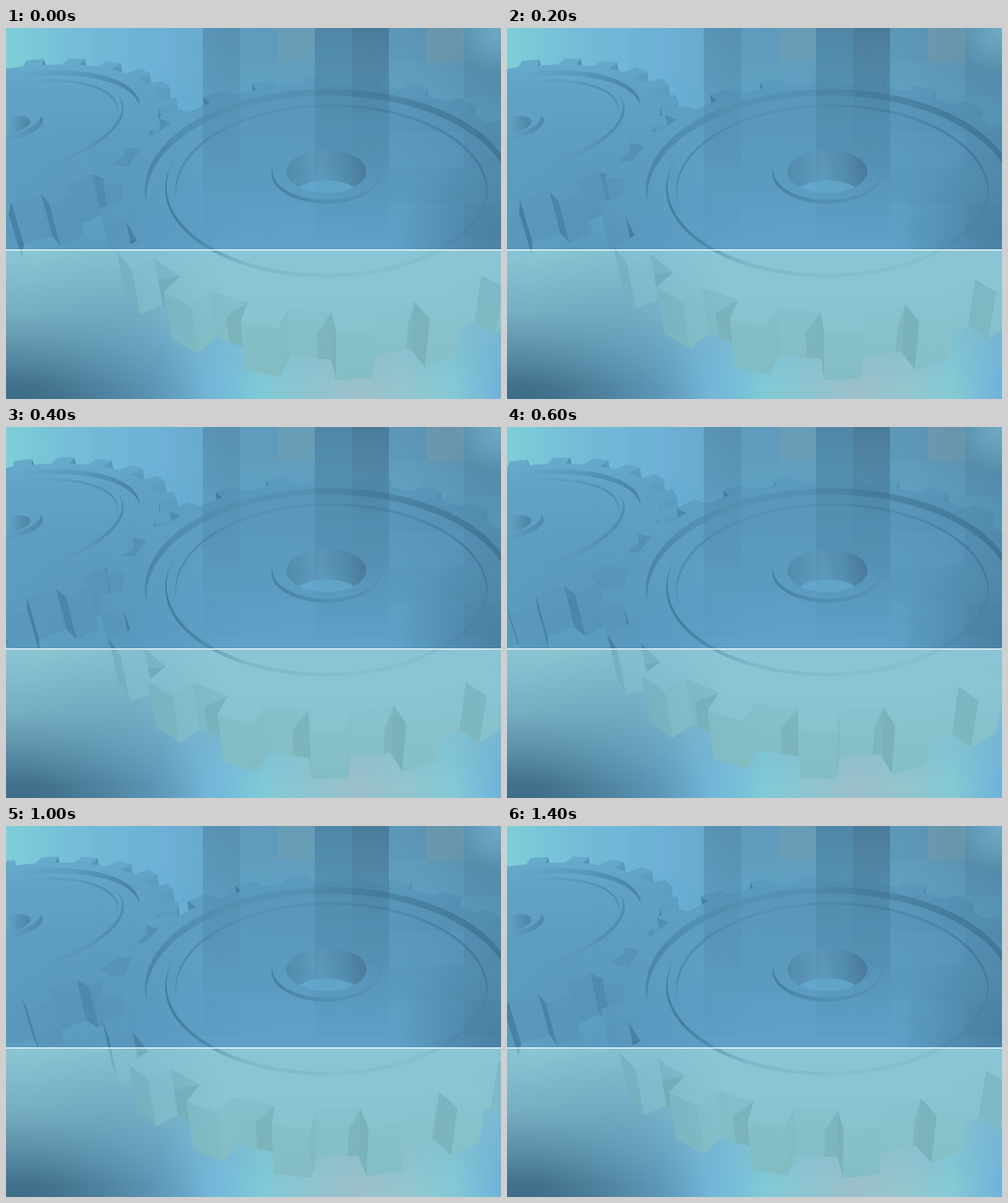
These frames come from a looping animation (800 by 600 pixels, 1500 ms). An HTML page with a canvas:

```html
<!DOCTYPE html>
<html lang="en">
<head>
<meta charset="utf-8">
<title>Gears</title>
<style>
  html, body { margin: 0; width: 100%; height: 100%; overflow: hidden; }
  canvas { display: block; }
</style>
</head>
<body>
<canvas id="stage" width="800" height="600"></canvas>
<script>
const ctx = document.getElementById('stage').getContext('2d');
const LOOP = 1500, STEP = 100, SPLIT = 359, TAU = Math.PI * 2, DEG = Math.PI / 180;
const LIGHT = 65 * DEG, DEPTH = 0.086;

// Both gears lie on one ground plane; v points to the viewer, t goes down.
const front = { u: 0.006, v: 0, tip: 1.004, root: 0.916, teeth: 20, phase: 85.2 * DEG, dir: 1 };
const back = { u: -1.66, v: -0.41, tip: 0.868, root: 0.771, teeth: 21, phase: 0.2 * DEG, dir: -1 };
const frontHub = { u: -0.006, v: 0 }, frontDisc = { u: 0.016, v: 0 }, backHub = { u: -1.66, v: -0.44 };

function project(u, v, t) {
  const w = 1 - 0.301 * v + 0.0387 * t;
  return [520 + 352 * u / w, -400 + (622 + 92 * t) / w];
}

function gradient(x0, y0, x1, y1, ...stops) {
  const g = ctx.createLinearGradient(x0, y0, x1, y1);
  stops.forEach(([at, color]) => g.addColorStop(at, color));
  return g;
}

function glow(x, y, r, rgb, alpha) {
  const g = ctx.createRadialGradient(x, y, 0, x, y, r);
  g.addColorStop(0, `rgba(${rgb},${alpha})`);
  g.addColorStop(0.45, `rgba(${rgb},${alpha * 0.6})`);
  g.addColorStop(1, `rgba(${rgb},0)`);
  return g;
}

function rect(fill, x, y, w, h) {
  ctx.fillStyle = fill;
  ctx.fillRect(x, y, w, h);
}

function polygon(points, fill, alpha = 1) {
  ctx.beginPath();
  points.forEach(p => ctx.lineTo(...p));
  ctx.closePath();
  ctx.globalAlpha = alpha;
  ctx.fillStyle = fill;
  ctx.fill();
  ctx.globalAlpha = 1;
}

const cut = SPLIT / 600;
const metal = gradient(0, 0, 0, 600, [0.08, '#67abcc'], [0.17, '#61a2c6'], [0.3, '#60a0c5'],
  [cut, '#62a4cb'], [cut, '#8bc5d5'], [0.75, '#89c5d1'], [0.95, '#86c0c7']);
const shade = gradient(0, 0, 0, 600, [0, '#2f6482'], [cut, '#2f6482'],
  [cut, '#689fb0'], [1, '#70a8a8']);

function drawBackground() {
  rect(gradient(0, 0, 800, 0, [0, '#7dcfd8'], [0.14, '#74bdd8'], [0.33, '#70b4db'],
    [0.45, '#69a9cb'], [1, '#6aa7c6']), 0, 0, 800, SPLIT);
  rect(gradient(0, 60, 0, SPLIT, [0, 'rgba(98,174,216,0)'], [0.5, 'rgba(98,174,216,.8)'],
    [1, 'rgba(98,166,204,.9)']), 0, 0, 800, SPLIT);

  rect(gradient(0, 0, 800, 0, [0, '#6c9fb8'], [0.3, '#6aa9cc'], [0.43, '#74b8da'],
    [0.52, '#80cad6'], [0.7, '#9bc0cb'], [0.8, '#94c5ce'], [0.9, '#84cad4'],
    [1, '#6fb2da']), 0, SPLIT, 800, 241);
  rect(glow(20, 640, 310, '55,102,128', 1), 0, SPLIT, 400, 241);
  rect(gradient(0, SPLIT, 0, 580, [0, 'rgba(142,200,212,.95)'], [0.45, 'rgba(130,188,206,.75)'],
    [1, 'rgba(120,180,204,0)']), 0, SPLIT, 800, 221);
}

function drawGear(gear, progress) {
  const pitch = TAU / gear.teeth;
  const at = (r, a) => [gear.u + r * Math.cos(a), gear.v + r * Math.sin(a)];
  const outline = [];
  for (let i = 0; i < gear.teeth; i++) {
    const a = gear.phase + (i + gear.dir * progress) * pitch;
    outline.push(at(gear.root, a - 0.245 * pitch), at(gear.tip, a - 0.2 * pitch),
      at(gear.tip, a + 0.2 * pitch), at(gear.root, a + 0.245 * pitch));
  }

  const walls = [];
  outline.forEach((p, i) => {
    const q = outline[(i + 1) % outline.length];
    const spot = (k, t) => project(p[0] + (q[0] - p[0]) * k, p[1] + (q[1] - p[1]) * k, t);
    const quad = [spot(0, 0), spot(1, 0), spot(1, 1), spot(0, 1)];
    const [a, b, , d] = quad;
    const facing = (b[0] - a[0]) * (d[1] - a[1]) - (b[1] - a[1]) * (d[0] - a[0]) < 0;
    if (facing) walls.push({ p, q, spot, quad, isGap: i % 4 === 3, y: a[1] + b[1] });
  });
  walls.sort((a, b) => a.y - b.y);

  for (const { p, q, spot, quad, isGap } of walls) {
    const du = q[0] - p[0], dv = q[1] - p[1], length = Math.hypot(du, dv);
    const normal = Math.atan2(-du, dv);
    const lit = Math.max(0, Math.cos(normal - LIGHT));
    polygon(quad, metal);
    polygon(quad, shade, 0.04 + 0.5 * (1 - lit));
    if (!isGap) continue;
    // shadow of the neighbouring tooth
    const turn = Math.atan2(Math.sin(normal - LIGHT), Math.cos(normal - LIGHT));
    if (turn <= 0) continue;
    const f = turn > 1.4 ? 1 : Math.min(1, DEPTH * Math.tan(turn) / length);
    polygon([spot(0, 0), spot(f, 0.45), spot(f, 1), spot(0, 1)], shade, 0.38);
  }
  polygon(outline.map(([u, v]) => project(u, v, 0)), metal);
}

function ring(center, r, t) {
  const path = new Path2D();
  for (let i = 0; i < 120; i++) {
    const a = i / 120 * TAU;
    path.lineTo(...project(center.u + r * Math.cos(a), center.v + r * Math.sin(a), t));
  }
  path.closePath();
  return path;
}

// Fills the part of the first ring that the second one leaves free.
function crescent(center, [r1, t1], [r2, t2], fill) {
  const rest = new Path2D();
  rest.rect(-600, -100, 2000, 800);
  rest.addPath(ring(center, r2, t2));
  ctx.save();
  ctx.clip(ring(center, r1, t1));
  ctx.fillStyle = fill;
  ctx.fill(rest, 'evenodd');
  ctx.restore();
}

function fade(x0, x1, ...alphas) {
  return gradient(x0, 0, x1, 0,
    ...alphas.map((a, i) => [i / (alphas.length - 1), `rgba(47,98,128,${a})`]));
}

function drawHole(center, r, fill) {
  ctx.save();
  ctx.clip(ring(center, r, 0.12));
  rect(fill, 0, 0, 800, SPLIT);
  ctx.fillStyle = '#69aed4';
  ctx.fill(ring(center, r, 0.9));
  ctx.restore();
}

function drawBackDetails() {
  crescent(backHub, [0.66, 0.02], [0.66, 0.17], fade(20, 215, 0, 0.2, 0.5));
  crescent(backHub, [0.545, 0.06], [0.54, 0.12], fade(20, 185, 0, 0.15, 0.35));
  crescent(backHub, [0.575, 0.06], [0.567, 0], fade(60, 190, 0, 0.1, 0.35));
  crescent(backHub, [0.16, 0.15], [0.152, 0.04], fade(0, 54, 0, 0.15, 0.35));
  drawHole(backHub, 0.1, gradient(0, 0, 35, 0, [0, '#64a4c8'], [1, '#4f87a8']));
}

function drawFrontDetails() {
  crescent(front, [0.82, 0], [0.82, 0.18], fade(223, 817, 0.42, 0.1, 0.16, 0.42, 0.5));
  crescent(frontDisc, [0.705, 0.17], [0.704, 0.24], fade(270, 777, 0.4, 0.1, 0.16, 0.28, 0.45));
  crescent(frontHub, [0.725, 0.1], [0.718, 0.05], fade(260, 780, 0.6, 0.12, 0.06, 0.06, 0.1));
  crescent(frontHub, [0.253, 0.15], [0.248, 0.08], fade(429, 606, 0.5, 0.32, 0.2, 0.08));
  drawHole(frontHub, 0.184, gradient(453, 0, 584, 0, [0, '#568eb0'], [0.45, '#66a5c8'], [1, '#4d80a0']));
}

function drawBands() {
  const strength = [0.27, 0.12, 0.13, 0.42, 0.55, 0.12, 0.14, 0.2];
  const left = i => 318 + Math.round(i * 60.25);
  strength.forEach((a, i) => {
    const x = left(i), width = left(i + 1) - x;
    rect(gradient(0, 0, 0, 330, [0, `rgba(48,88,116,${a})`], [0.35, `rgba(48,88,116,${a * 0.6})`],
      [1, 'rgba(48,88,116,0)']), x, 0, width, 330);
    for (let row = 0; row < 6; row++) {
      const alpha = (i > 4 ? 0.02 : 0.008) * ((i * 3 + row * 2) % 4);
      rect(`rgba(48,88,116,${alpha})`, x, row * 57 - 2, width, 57);
    }
  });
  rect('rgba(120,162,178,.45)', left(2), 0, 60, 55);
  rect('rgba(120,160,174,.7)', left(6), 0, 60, 55);
  [137, 197, 258].forEach(x => rect('rgba(60,120,160,.03)', x, 0, 800 - x, SPLIT));
}

function drawLighting() {
  rect(gradient(640, 0, 800, 0, [0, 'rgba(48,88,116,0)'], [1, 'rgba(48,88,116,.16)']), 640, 0, 160, SPLIT);
  rect(glow(800, 370, 180, '48,88,116', 0.35), 600, 150, 200, SPLIT - 150);
  rect(glow(800, 0, 75, '125,190,215', 0.65), 700, 0, 100, 100);
  rect(glow(110, 370, 250, '60,108,142', 0.26), 0, 100, 400, SPLIT - 100);
  rect(glow(190, 470, 170, '92,152,180', 0.3), 0, SPLIT, 400, 241);
}

function drawFrame(now) {
  const progress = Math.floor(now % LOOP / STEP) * STEP / LOOP;
  drawBackground();
  drawGear(back, progress);
  drawBackDetails();
  drawGear(front, progress);
  drawFrontDetails();
  drawBands();
  drawLighting();
  rect('#e6f4f9', 0, SPLIT - 1, 800, 2);
}

const start = performance.now();
function tick() {
  drawFrame(performance.now() - start);
  requestAnimationFrame(tick);
}
tick();
</script>
</body>
</html>
```
